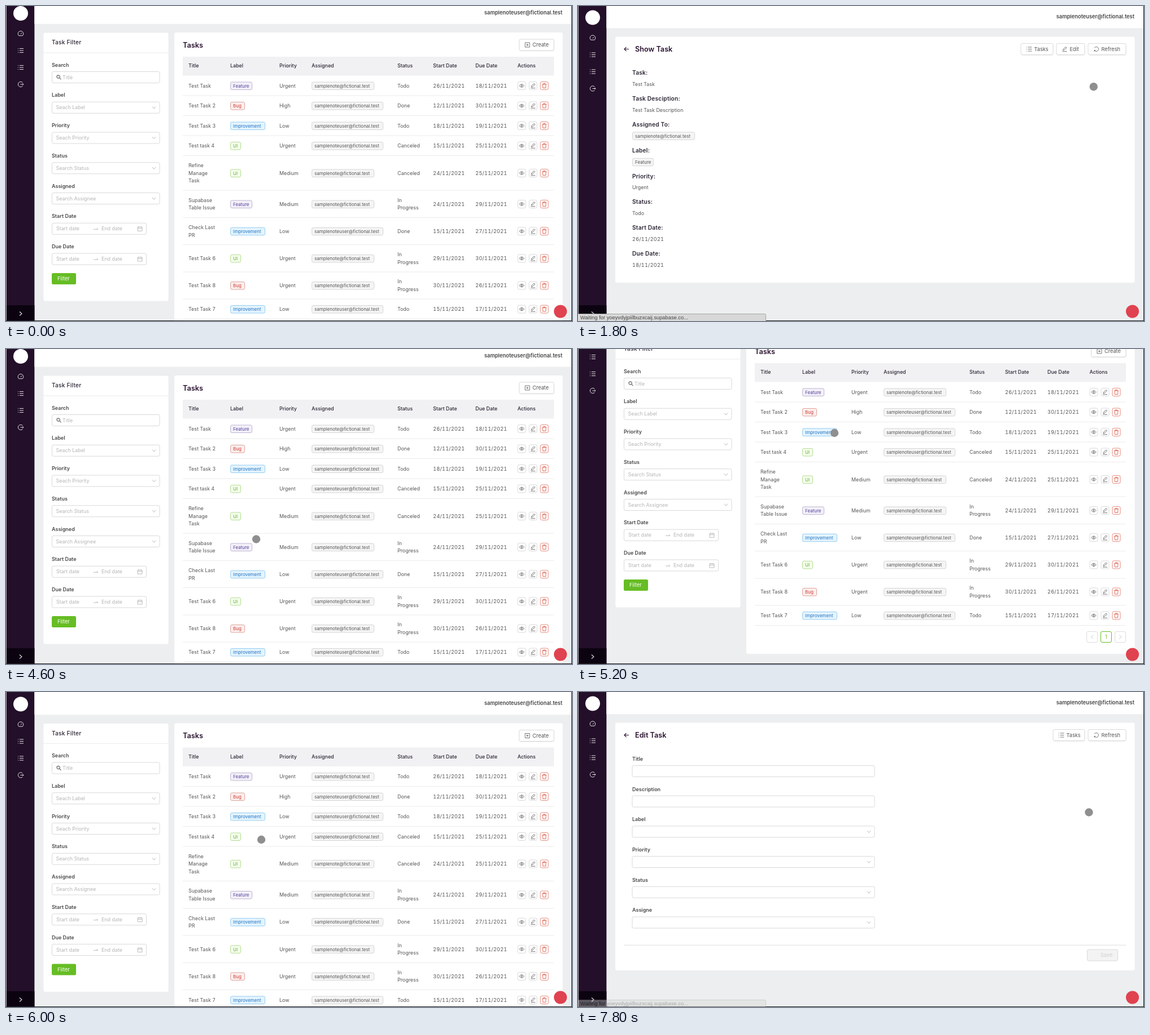
These frames come from a looping animation (1002x559 px, 8 s). An HTML page:

```html
<!DOCTYPE html>
<html lang="en">
<head>
<meta charset="utf-8">
<title>Task manager</title>
<style>
html, body { margin: 0; width: 100%; height: 100%; overflow: hidden; background: #eceeef; }
svg { display: block; width: 100vw; height: 100vh; }
text { font: 8.9px Inter, sans-serif; fill: #555; white-space: pre; }
.head { font-weight: 500; fill: #2b2433; }
.label { font-size: 9px; font-weight: 600; fill: #484848; }
.strong { font-size: 10.2px; letter-spacing: .2px; font-weight: 600; fill: #2b2433; }
.title { font-size: 12.7px; font-weight: 600; fill: #2a1230; }
.user { font-size: 9.3px; font-weight: 600; fill: #444; }
.date { font-size: 9.1px; letter-spacing: .25px; font-variant-numeric: tabular-nums; }
.hint { fill: #b5b5b5; }
.tag { font-size: 8px; }
.btn { font-size: 9.2px; }
.status { font: 9.3px "Liberation Sans", sans-serif; fill: #444; }
</style>
</head>
<body>
<svg id="stage" viewBox="0 0 1002 559" preserveAspectRatio="none"></svg>
<script>
const LOOP = 8000, STEP = 200;
const USER = 'samplenoteuser@fictional.test', TESTER = 'samplenote@fictional.test';

const ICONS = {
  list: 'M-2 -3.5H5M-2 0H5M-2 3.5H5M-5 -3.5h1M-5 0h1M-5 3.5h1',
  gauge: 'M-3.3 3.7A4.8 4.8 0 1 1 3.3 3.7ZM0 1L2 -1.5',
  logout: 'M3.5 -3A4.6 4.6 0 1 0 3.5 3M-.5 0H5M3.5 -1.5L5 0L3.5 1.5',
  right: 'M-2 -3.5L2 0L-2 3.5',
  left: 'M2 -3L-1.5 0L2 3',
  down: 'M-3 -1.8L0 1.8L3 -1.8',
  back: 'M4 0H-4M-.5 -3.5L-4 0L-.5 3.5',
  arrow: 'M-4 1H4L1.5 -1',
  search: 'M-3.5 -1A2.7 2.7 0 1 1 1.9 -1A2.7 2.7 0 1 1 -3.5 -1M1.2 1L4 3.8',
  calendar: 'M-4 -3H4V4H-4ZM-4 -.5H4M-2 -4.2V-2M2 -4.2V-2',
  plus: 'M-4 -4H4V4H-4ZM-2 0H2M0 -2V2',
  eye: 'M-4.2 0Q0 -5.6 4.2 0Q0 5.6 -4.2 0ZM-1.3 0A1.3 1.3 0 1 1 1.3 0A1.3 1.3 0 1 1 -1.3 0',
  pencil: 'M-3 2.2L-2.6 .2L2 -4L3.6 -2.4L-1 1.8ZM-4 4.2H4',
  trash: 'M-4 -2.5H4M-1.5 -2.5V-4H1.5V-2.5M-3 -2.5L-2.6 4H2.6L3 -2.5',
  reload: 'M-2 3.5A4 4 0 1 1 2 3.5M2 3.5V1.3M2 3.5H4'
};

const TAGS = {
  Feature: [39, '#f4f0f9', '#beb4d2', '#51449a'],
  Bug: [26, '#fbefed', '#dfa39b', '#cf3a36'],
  Improvement: [62, '#e4f4fd', '#94cdf2', '#2273c4'],
  UI: [19, '#f4fdeb', '#b4dd93', '#5aa935']
};

// title, label, priority, assignee, status, start, due, centre y, bottom border y
const TASKS = [
  ['Test Task', 'Feature', 'Urgent', TESTER, 'Todo', '26/11/2021', '18/11/2021', 149, 166.5],
  ['Test Task 2', 'Bug', 'High', USER, 'Done', '12/11/2021', '30/11/2021', 184.5, 202],
  ['Test Task 3', 'Improvement', 'Low', USER, 'Todo', '18/11/2021', '19/11/2021', 220, 237.5],
  ['Test task 4', 'UI', 'Urgent', USER, 'Canceled', '15/11/2021', '25/11/2021', 255.5, 273],
  ['Refine|Manage|Task', 'UI', 'Medium', TESTER, 'Canceled', '24/11/2021', '25/11/2021', 304, 334.5],
  ['Supabase|Table Issue', 'Feature', 'Medium', TESTER, 'In|Progress', '24/11/2021', '29/11/2021', 359, 383],
  ['Check Last|PR', 'Improvement', 'Low', USER, 'Done', '15/11/2021', '27/11/2021', 407.2, 431],
  ['Test Task 6', 'UI', 'Urgent', TESTER, 'In|Progress', '29/11/2021', '30/11/2021', 455.4, 479.5],
  ['Test Task 8', 'Bug', 'Urgent', TESTER, 'In|Progress', '30/11/2021', '26/11/2021', 503.5, 527.5],
  ['Test Task 7', 'Improvement', 'Low', USER, 'Todo', '15/11/2021', '17/11/2021', 545.5, 563]
];

const rect = (x, y, w, h, fill, stroke = 'none', r = 0) =>
  `<rect x="${x}" y="${y}" width="${w}" height="${h}" rx="${r}" fill="${fill}" stroke="${stroke}"/>`;
const text = (x, y, str, cls = '', extra = '') =>
  `<text x="${x}" y="${y + 3.1}" class="${cls}" ${extra}>${str}</text>`;
const lines = (x, y, str) => str.split('|').map((line, i, all) =>
  text(x, y + (i - (all.length - 1) / 2) * 13.5, line)).join('');
const icon = (name, x, y, color = '#666', width = 1, cls = '') =>
  `<g transform="translate(${x} ${y})"><path class="${cls}" d="${ICONS[name]}" fill="none" stroke="${color}" stroke-width="${width}"/></g>`;
const rule = (x1, x2, y, color = '#ececec') => rect(x1, y - .5, x2 - x1, 1, color);
const card = (x, y, w, h) => rect(x, y, w, h, '#fff', 'none', 3);
const field = (x, y, w) => rect(x, y - 10, w, 20, '#fff', '#d9d9d9', 2.5);
const button = (x, y, w, name, str, cls = '') =>
  rect(x + .5, y - 8.5, w, 20, '#f0f0f0', 'none', 3) + field(x, y, w) +
  icon(name, x + 14.5, y, '#666', .9, cls) + text(x + 23.5, y, str, 'btn');
const tag = (x, y, w, str, fill = '#f5f5f5', stroke = '#d6d6d6', color = '#555') =>
  rect(x + .5, y - 6.5, w - 1, 13.5, fill, stroke, 2.5) +
  text(x + 5, y, str, 'tag', `style="fill:${color}"`);
const emailTag = (x, y, email) => tag(x, y, email === USER ? 127 : 111, email);

function taskRow([title, label, priority, email, status, start, due, y, border]) {
  const [width, ...colors] = TAGS[label];
  const actions = [['eye', 913], ['pencil', 933], ['trash', 953]].map(([name, x]) => {
    const danger = name === 'trash';
    return rect(x - 7, y - 7, 14, 14, '#fff', danger ? '#e58b7d' : '#d9d9d9', 2.5) +
      icon(name, x, y, danger ? '#dc5b49' : '#666', .9);
  });
  return lines(323, y, title) + tag(397, y, width, label, ...colors) + text(484, y, priority) +
    emailTag(541, y, email) + lines(693, y, status) + text(756, y, start, 'date') +
    text(831, y, due, 'date') + actions.join('') + rule(313, 970, border);
}

function filterPanel() {
  const names = ['Search', 'Label', 'Priority', 'Status', 'Assigned', 'Start Date', 'Due Date'];
  const hints = ['Title', 'Seach Label', 'Seach Priority', 'Search Status', 'Search Assignee'];
  const rows = names.map((name, i) => {
    const y = 134 + 53.75 * i, range = i > 4;
    let out = text(81, y - 22, name, 'label') + field(81.5, y, range ? 167 : 190.5);
    if (range) {
      out += text(89, y, 'Start date', 'hint') + icon('arrow', 159, y, '#bbb') +
        text(169, y, 'End date', 'hint') + icon('calendar', 237, y, '#bbb');
    } else {
      out += text(i ? 88.5 : 100, y, hints[i], 'hint') +
        (i ? icon('down', 262, y, '#bbb') : icon('search', 93.5, y, '#666', 1.2));
    }
    return out;
  });
  return card(66.5, 55, 221, 476) + text(81, 72.5, 'Task Filter', 'strong', 'style="font-weight:500"') +
    rule(66.5, 287.5, 90.5) + rows.join('') + rect(81, 481.5, 43, 20, '#66bd24', 'none', 2.5) +
    text(91, 491.5, 'Filter', 'btn', 'style="fill:#fff"');
}

function listPage() {
  const columns = { Title: 323, Label: 397, Priority: 484, Assigned: 541, Status: 693,
    'Start Date': 756, 'Due Date': 831, Actions: 905.5 };
  const heads = Object.entries(columns).map(([name, x]) => text(x, 113.5, name, 'head')).join('');
  const pages = [['left', 910], ['', 935], ['right', 960]].map(([name, x]) =>
    rect(x - 9.5, 574, 19, 19, '#fff', name ? '#dcdcdc' : '#66bd24', 2.5) +
    (name ? icon(name, x, 583.5, '#ccc') : text(x - 2, 583.5, '1', '', 'style="fill:#66bd24"')));
  return filterPanel() + card(298, 54.5, 687.5, 559) + text(313, 78, 'Tasks', 'title') +
    button(908.5, 76.5, 61.5, 'plus', 'Create') + rect(313, 97.5, 657, 33.5, '#f1f1f3') + heads +
    TASKS.map(taskRow).join('') + pages.join('');
}

const detailHeader = (title, height) => card(66, 54.5, 919.5, height) +
  icon('back', 86, 76.5, '#2a1230', 1.1) + text(101, 77.8, title, 'title') +
  button(903, 76.5, 67, 'reload', 'Refresh', 'spin');

function showPage() {
  const rows = [['Task:', 'Test Task'], ['Task Desciption:', 'Test Task Description'],
    ['Assigned To:', TESTER], ['Label:', 'Feature'], ['Priority:', 'Urgent'],
    ['Status:', 'Todo'], ['Start Date:', '26/11/2021'], ['Due Date:', '18/11/2021']];
  return detailHeader('Show Task', 436.5) + button(784, 76.5, 57, 'list', 'Tasks') +
    button(847, 76.5, 50, 'pencil', 'Edit') + rows.map(([name, value], i) => {
      const y = 118.8 + 45.9 * i;
      const body = value === TESTER ? emailTag(96, y + 19.8, value)
        : value === 'Feature' ? tag(96, y + 20.3, 38, value)
        : text(96, y + 19.8, value, i > 5 ? 'date' : '');
      return text(96, y, name, 'strong') + body;
    }).join('');
}

function editPage() {
  const names = ['Title', 'Description', 'Label', 'Priority', 'Status', 'Assigne'];
  return detailHeader('Edit Task', 439.5) + button(841, 76.5, 56, 'list', 'Tasks') +
    names.map((name, i) => {
      const y = 140.5 + 53.7 * i;
      return text(96, y - 21.7, name, 'label') + field(96, y, 429) +
        (i > 1 ? icon('down', 515, y, '#bbb') : '');
    }).join('') + rule(81, 970, 449.2, '#dcdcdc') +
    rect(901.5, 457, 54, 20, '#f3f3f3', '#d9d9d9', 2.5) + text(925, 467, 'Save', 'btn', 'style="fill:#d0d0d0"');
}

const menu = ['gauge', 'list', 'list', 'logout']
  .map((name, i) => icon(name, 26, 56.5 + 30 * i, '#e4dfe6')).join('');

document.getElementById('stage').innerHTML =
  rect(0, 0, 1002, 559, '#eceeef') + rect(1, 0, 49.4, 559, '#230f29') +
  `<g id="page">${rect(50.4, -5, 951, 44.3, '#fff')}
    ${text(985, 19.3, USER, 'user', 'text-anchor="end"')}
    <circle cx="26" cy="20.5" r="13" fill="#fff"/>${menu}
    <g id="list">${listPage()}</g><g id="show">${showPage()}</g><g id="edit">${editPage()}</g></g>` +
  rect(1, 531, 49.4, 27, '#0b0410') + icon('right', 26, 546, '#e4dfe6', 1.1) +
  '<circle cx="981.5" cy="542" r="11.5" fill="#e04250"/>' +
  rect(0, 0, 1, 559, '#b9b4bc') + rect(1001, 0, 1, 559, '#1c1c08') + rect(0, 558, 1002, 1, '#1c1c1c') +
  `<g id="bubble">${rect(-2, 546.5, 334.5, 15, '#d8d8d8', '#a5a5a5', 2)}
    ${text(4, 553, 'Waiting for yoeyvdyjpiilbuzxcaij.supabase.co...', 'status')}</g>` +
  '<circle id="cursor" r="7.2" fill="#8f8f8f"/>';

const el = id => document.getElementById(id);
const spinners = document.querySelectorAll('.spin');

// Each stop: time, then the values reached at that time.
const CURSOR = [[200, 626, 383], [400, 626, 383], [1200, 912.8, 143.2], [2400, 912.8, 143.2],
  [3400, 231.5, 121], [3800, 86, 77], [4000, 86, 77], [4600, 443, 337.5], [5200, 454, 149],
  [5400, 454, 149], [6000, 452, 262], [6400, 452, 262], [7200, 932, 220], [7600, 932, 219], [7800, 904.5, 213.5]];
const SCROLL = [[0, -7.5], [1200, -7.5], [1400, 0], [4400, 0], [4600, -7.5], [5000, -72.5],
  [5400, -72.5], [5800, 1], [7400, 1], [7600, 0]];

function follow(track, t) {
  const next = track.findIndex(stop => stop[0] > t);
  if (next < 0) return track.at(-1).slice(1);
  if (next === 0) return track[0].slice(1);
  const a = track[next - 1], b = track[next];
  const k = (t - a[0]) / (b[0] - a[0]), eased = k * k * (3 - 2 * k);
  return a.slice(1).map((v, i) => v + (b[i + 1] - v) * eased);
}

function draw(now) {
  const t = Math.floor(now % LOOP / STEP) * STEP;
  const view = t >= 7600 ? 'edit' : t >= 1400 && t < 4000 ? 'show' : 'list';
  for (const id of ['list', 'show', 'edit']) el(id).style.display = id === view ? '' : 'none';

  el('page').setAttribute('transform', `translate(0 ${follow(SCROLL, t)[0]})`);
  el('cursor').setAttribute('transform', `translate(${follow(CURSOR, t)})`);
  el('cursor').style.display = t < 200 ? 'none' : '';
  el('bubble').style.opacity = t >= 7800 ? .4 : t >= 1600 && t < 2800 ? 1 : 0;

  const loading = t < 2800 || t >= 7600;
  const angle = loading ? 90 + (t - 1800) * .36 : 0;
  spinners.forEach(s => s.setAttribute('transform', `rotate(${angle})`));
  requestAnimationFrame(draw);
}
requestAnimationFrame(draw);
</script>
</body>
</html>
```
